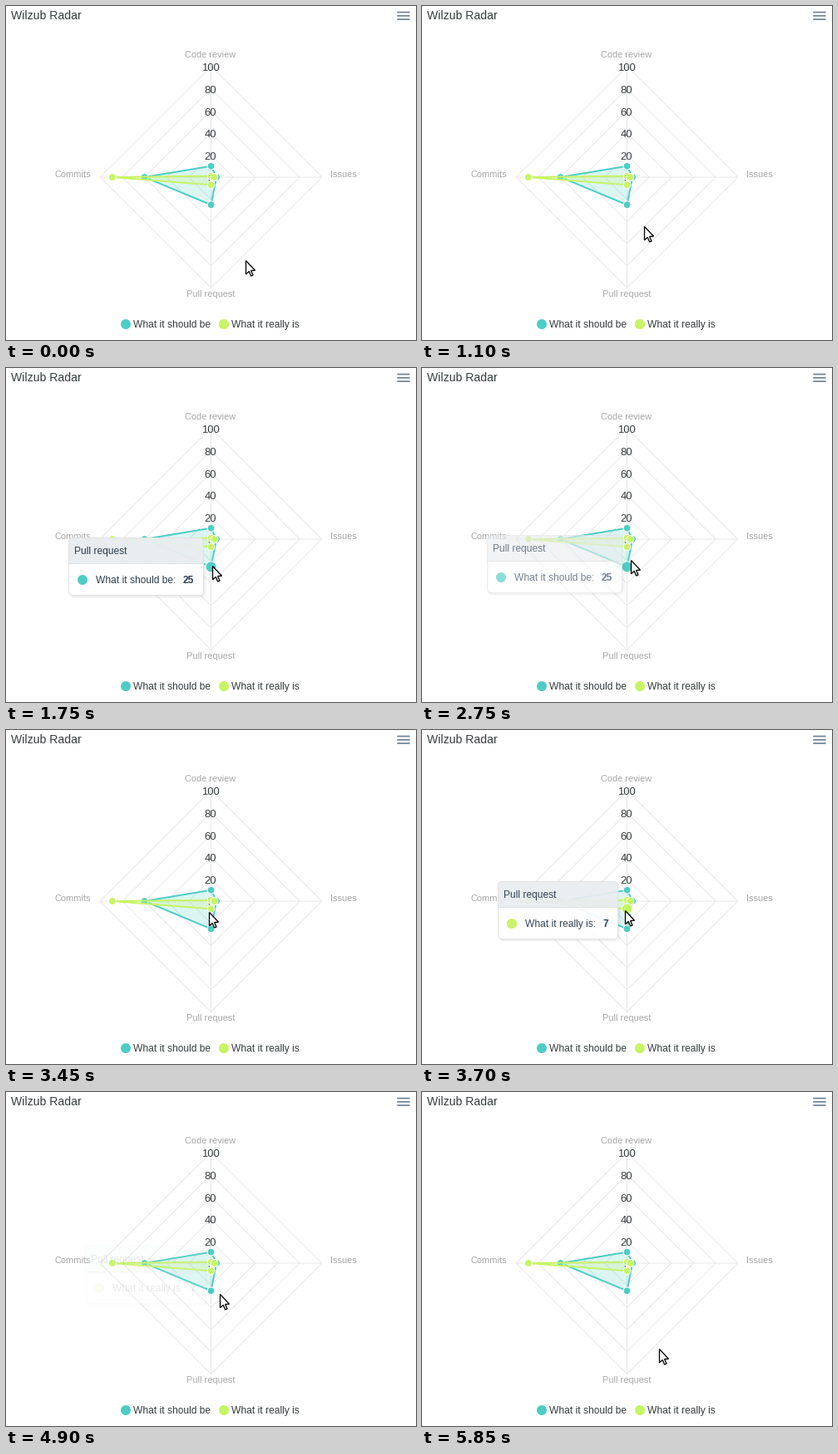
Write a matplotlib script that moves like this. It is 493 px wide and 402 px high and loops after 6.82 s.

```python
import numpy as np
import matplotlib.pyplot as plt
from matplotlib.animation import FuncAnimation
from matplotlib.patches import Circle, PathPatch, Polygon
from matplotlib.path import Path
from matplotlib.transforms import Affine2D

W, H, DPI = 493, 402, 64
LOOP_MS, STEP_MS, TICK_MS = 6820, 20, 50
PT = 72 / DPI  # points per pixel

TEAL, LIME = "#4ecdc4", "#c7f464"
INK, MUTED, GRID, TIP_INK = "#373d3f", "#a8a8a8", "#e8e8e8", "#2c3e50"
CENTER = np.array([246.5, 206.0])
RADIUS = 133.3
AXES = np.array([[0, -1], [1, 0], [0, 1], [-1, 0]])  # top, right, bottom, left
PULL = 2

plt.rcParams.update({"font.family": "Liberation Sans", "path.snap": False})
fig = plt.figure(figsize=(W / DPI, H / DPI), dpi=DPI, facecolor="white")
ax = fig.add_axes([0, 0, 1, 1])
ax.set(xlim=(0, W), ylim=(H, 0))
ax.axis("off")


def text(x, y, s, size=12, color=INK, zorder=1, **kw):
    return ax.text(x, y, s, fontsize=size * PT, color=color, va="baseline", zorder=zorder, **kw)


def shape(patch):
    return ax.add_patch(patch)


def line(start, end, color, width=1):
    ax.plot(*zip(start, end), color=color, lw=width * PT, solid_capstyle="butt", zorder=1)


def radar_points(values):
    return CENTER + AXES * np.array(values)[:, None] * RADIUS / 100


def draw_chart():
    text(6, 16, "Wilzub Radar", 14)
    for k in (-1, 0, 1):
        y = 11.8 + 4.25 * k
        line((470.3, y), (485.6, y), "#6e8192", 1.7)

    for level in range(20, 101, 20):
        shape(Polygon(radar_points([level] * 4), fill=False, ec=GRID, lw=PT))
    for end in radar_points([100] * 4):
        line(CENTER, end, GRID)
    mid = CENTER[0] - 0.5
    for level in range(0, 101, 20):
        text(mid, CENTER[1] - level * RADIUS / 100 + 5.8, str(level), 13, ha="center")

    text(mid, 62, "Code review", 11, MUTED, ha="center")
    text(390, 206, "Issues", 11, MUTED)
    text(mid, 350, "Pull request", 11, MUTED, ha="center")
    text(102.5, 206, "Commits", 11, MUTED, ha="right")

    for x, color, name in ((144, TEAL, "What it should be"), (262, LIME, "What it really is")):
        shape(Circle((x, 383), 6, fc=color, lw=0))
        text(x + 9, 387, name)


def draw_series(values, color):
    """Draw one radar outline and return its pull-request marker."""
    points = radar_points(values)
    shape(Polygon(points, fc=color, alpha=0.2, lw=0))
    shape(Polygon(points, fill=False, ec=color, lw=2 * PT, joinstyle="round"))
    marks = [shape(Circle(p, 4.4, fc=color, ec="white", lw=PT)) for p in points]
    return marks[PULL]


def half_box(width, y_flat, y_round, radius=5):
    """Panel with two rounded corners on its y_round side."""
    r = radius if y_flat > y_round else -radius
    x0, x1 = 0.5, width + 0.5
    points = [(x0, y_flat), (x0, y_round + r), (x0, y_round), (x0 + radius, y_round),
              (x1 - radius, y_round), (x1, y_round), (x1, y_round + r), (x1, y_flat),
              (x0, y_flat)]
    L, C = Path.LINETO, Path.CURVE3
    return Path(points, [Path.MOVETO, L, C, C, L, C, C, L, Path.CLOSEPOLY])


def progress(t, start, end):
    """Share of a move that is done, its first step being visible at start."""
    return np.clip((t + TICK_MS - start) / (end + TICK_MS - start), 0, 1)


class Tooltip:
    def __init__(self, marker, color, width, label, value, show, hide, origin, rest, drift):
        self.marker, self.show, self.hide = marker, show, hide
        self.origin, self.rest, self.drift = map(np.array, (origin, rest, drift))
        self.move = Affine2D()
        self.parts = []
        tr = self.move + ax.transData

        def add(artist, alpha=1.0):
            self.parts.append((artist, alpha))

        def panel(path, alpha, **kw):
            add(shape(PathPatch(path, transform=tr, zorder=5, **kw)), alpha)

        def words(x, y, s, **kw):
            add(text(x, y, s, color=TIP_INK, transform=tr, zorder=6, **kw))

        body = half_box(width, 31.5, 69.5)
        for d in (1, 2, 3):
            shadow = Affine2D().translate(d, d).transform_path(body)
            panel(shadow, 0.1 / d, fill=False, ec="#666666", lw=1.5 * PT)
        panel(body, 0.97, fc="white", ec="#e3e3e3", lw=PT)
        panel(half_box(width, 31.5, 0.5), 0.97, fc="#e9edf0", ec="#e0e2e4", lw=PT)
        add(shape(Circle((17, 51), 6, fc=color, lw=0, transform=tr, zorder=6)))
        words(7, 20, "Pull request")
        words(33, 55, label)
        words(width - 11, 55, value, weight="bold", ha="right")

    def update(self, t):
        left = 1 - progress(t, *self.show)
        gone = progress(t, *self.hide)
        gone = gone * gone * (3 - 2 * gone)
        opacity = (1 - left ** 3) * (1 - gone)
        spot = self.rest + (self.origin - self.rest) * left ** 2 + self.drift * gone
        self.move.clear().translate(*np.round(spot))
        self.marker.set_radius(6.5 if opacity > 0.3 else 4.4)
        for artist, alpha in self.parts:
            artist.set_alpha(alpha * opacity)
            artist.set_visible(opacity > 0)


# Mouse moves: start, end, destination
CURSOR_HOME = np.array([288, 306])
CURSOR_MOVES = [
    (800, 900, (274, 278)), (1100, 1200, (253, 238)), (1400, 1500, (248, 238)),
    (2600, 2750, (251, 231)), (2800, 3150, (244, 219)), (3450, 4000, (245, 215)),
    (4750, 5350, (284, 307)), (5450, 5450, (285, 307)), (5850, 5850, (285, 309)),
]


def cursor_at(t):
    spot = CURSOR_HOME
    for start, end, target in CURSOR_MOVES:
        spot = spot + (np.array(target) - spot) * progress(t, start, end)
    return np.round(spot)


draw_chart()
teal_mark = draw_series([10, 5, 25, 60], TEAL)
lime_mark = draw_series([1, 3, 7, 89], LIME)
tooltips = [
    Tooltip(teal_mark, TEAL, 162, "What it should be:", "25", show=(1400, 1750),
            hide=(2700, 2900), origin=(64, 95), rest=(75, 204), drift=(8, -8)),
    Tooltip(lime_mark, LIME, 144, "What it really is:", "7", show=(3550, 3800),
            hide=(4750, 4950), origin=(82, 191), rest=(92, 181), drift=(3, 4)),
]

cursor_move = Affine2D()
shape(Polygon([(.5, .5), (.5, 16.8), (4.2, 13.4), (6.6, 19), (9, 18), (6.6, 12.5), (11.5, 12.2)],
              fc="white", ec="black", lw=1.3 * PT, zorder=9,
              transform=cursor_move + ax.transData))


def update(i):
    t = (i + 0.5) * STEP_MS // TICK_MS * TICK_MS
    cursor_move.clear().translate(*cursor_at(t))
    for tooltip in tooltips:
        tooltip.update(t)
    return []


anim = FuncAnimation(fig, update, frames=LOOP_MS // STEP_MS, interval=STEP_MS,
                     repeat=True, repeat_delay=0, blit=False)
plt.show()
```
